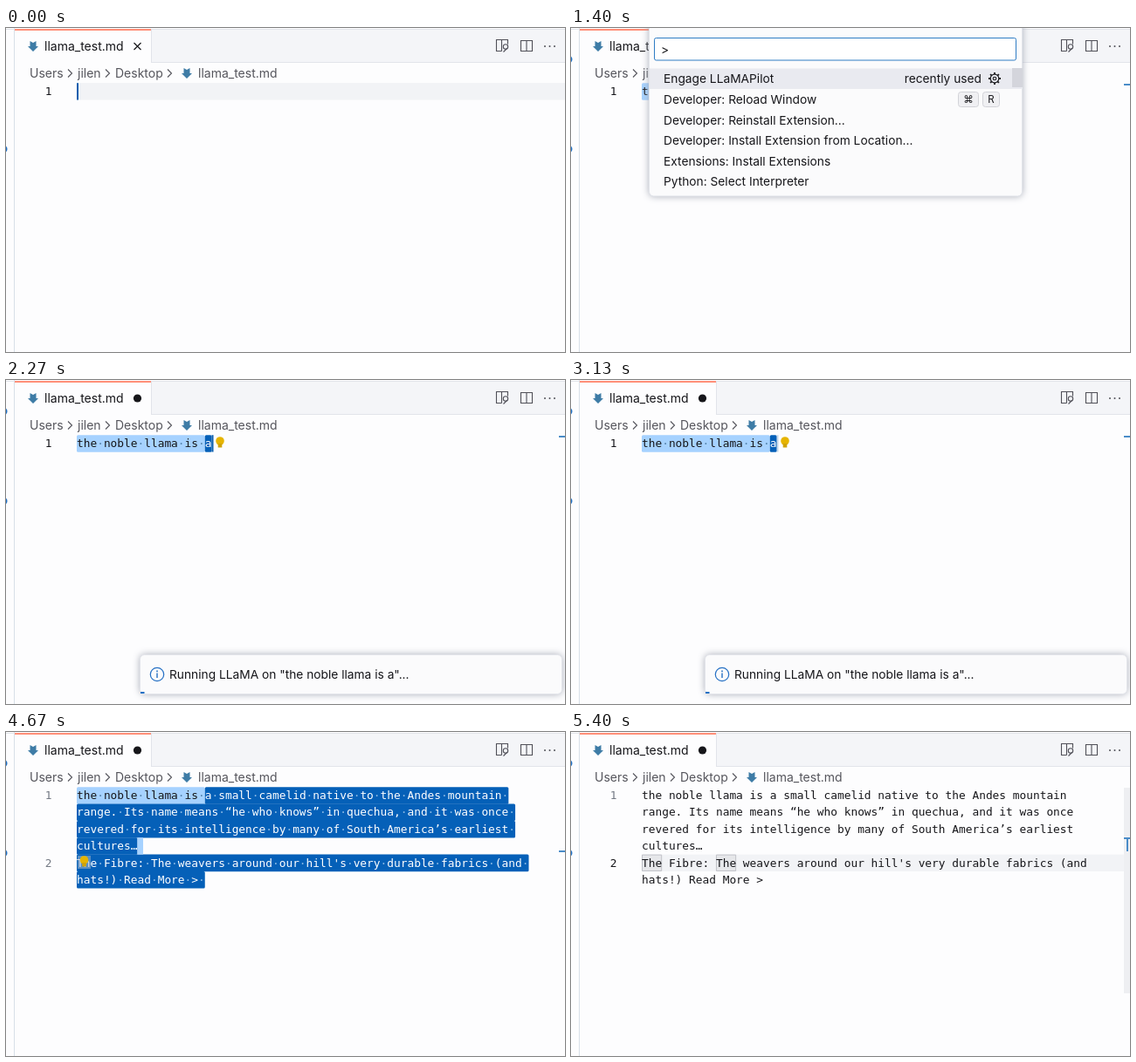
Write an HTML page with a canvas that moves like this. It is 640x372 px and loops after 5.47 s.

```html
<!DOCTYPE html>
<html lang="en">
<head>
<meta charset="utf-8">
<title>Editor completion demo</title>
<style>
html, body { margin: 0; width: 100%; height: 100%; overflow: hidden; background: #fdfdfe; }
canvas { display: block; }
</style>
</head>
<body>
<canvas id="stage" width="640" height="372"></canvas>
<script>
const c = document.getElementById('stage').getContext('2d');
const LOOP = 5470, FRAME = LOOP / 82;
const UI = '14px Inter, sans-serif', LIST = '13.75px Inter, sans-serif', KEY = '11.5px Inter, "DejaVu Sans", sans-serif';
const MONO = '12.83px "DejaVu Sans Mono", monospace';
const CHAR = 7.724, ROW = 19.35, LEFT = 81, TOP = 63.2;
const PAPER = '#fdfdfe', BAR = '#f4f5f8', ACTIVE = '#f2f3f6', EDGE = '#e2e4ea';
const INK = '#16161a', BLUE = '#0560b8', LIGHT = '#a6d2ff';

// Moments of the story, in ms
const AT = { type: 70, select: 1000, menu: 1130, run: 1790, insert: 4330, click: 4930, mark: 5260 };
const PROMPT = 'the noble llama is a';
const LINES = [
  PROMPT + ' small camelid native to the Andes mountain ',
  'range. Its name means “he who knows” in quechua, and it was once ',
  'revered for its intelligence by many of South America’s earliest ',
  'cultures…',
  'The Fibre: The weavers around our hill\'s very durable fabrics (and ',
  'hats!) Read More > '
];
const COMMANDS = ['Engage LLaMAPilot', 'Developer: Reload Window', 'Developer: Reinstall Extension...',
  'Developer: Install Extension from Location...', 'Extensions: Install Extensions', 'Python: Select Interpreter'];

const colX = n => LEFT + n * CHAR;
const rowY = n => TOP + n * ROW;
const ramp = (t, from, span) => Math.max(0, Math.min(1, (t - from) / span));
const blink = t => .5 + .5 * Math.cos((t - 2270) / 300 * 2 * Math.PI);

function rect(x, y, w, h, fill) {
  c.fillStyle = fill;
  c.fillRect(x, y, w, h);
}
function text(s, x, y, fill = INK, font = UI, align = 'left') {
  c.font = font;
  c.fillStyle = fill;
  c.textAlign = align;
  c.fillText(s, x, y);
}
function path(d, stroke, width = 1) {
  c.strokeStyle = stroke;
  c.lineWidth = width;
  c.stroke(new Path2D(d));
}
function disc(x, y, r, fill) {
  c.fillStyle = fill;
  c.beginPath();
  c.arc(x, y, r, 0, 7);
  c.fill();
}
function ring(x, y, r, stroke, width = 1) {
  c.strokeStyle = stroke;
  c.lineWidth = width;
  c.beginPath();
  c.arc(x, y, r, 0, 7);
  c.stroke();
}
function box(x, y, w, h, r, fill, stroke) {
  c.beginPath();
  c.roundRect(x, y, w, h, r);
  c.fillStyle = fill;
  c.fill();
  if (!stroke) return;
  c.shadowColor = 'transparent';
  c.strokeStyle = stroke;
  c.lineWidth = 1;
  c.stroke();
}
function panel(x, y, w, h) {
  c.save();
  c.shadowColor = '#a4a8b4';
  c.shadowBlur = 8;
  box(x, y, w, h, 5, '#fbfbfc', EDGE);
  c.restore();
}
function code(s, col, row, fill = INK) {
  text(s, colX(col), rowY(row) + 13.9, fill, MONO);
}
// Selected text shows its spaces as dim dots
function selected(s, col, row, dark) {
  box(colX(col), rowY(row), s.length * CHAR, ROW + .2, 1.5, dark ? BLUE : LIGHT);
  code(s.replace(/[^ ]/g, ' ').replace(/ /g, (_, i) => s[i] === ' ' ? '·' : ' '), col, row, dark ? '#8ab8e4' : '#5585ad');
  code(s, col, row, dark ? '#fff' : INK);
}
function lineNumber(n, row, active) {
  text(n, 52.5, rowY(row) + 13.9, active ? INK : '#747a84', MONO, 'right');
}
function activeRow(row) {
  rect(LEFT, rowY(row), 559, ROW, ACTIVE);
}
function caret(x, row, alpha = 1) {
  c.globalAlpha = alpha;
  rect(x, rowY(row), 2, ROW, '#0d5fae');
  c.globalAlpha = 1;
}
function bulb(x, y) {
  disc(x, y, 4.8, '#e6b400');
  rect(x - 2.3, y + 3, 4.6, 4.5, '#cfa30a');
}
function fileIcon(x, y) {
  c.fillStyle = '#3e7ca6';
  c.fill(new Path2D(`M${x - 3.5} ${y - 6}l3.5 2 3.5-2v6h2.5l-6 6-6-6h2.5z`));
}

function frame(dirty) {
  rect(0, 0, 640, 372, PAPER);
  rect(0, 1, 9, 1, EDGE);
  rect(166, 2, 474, 38, BAR);
  rect(166, 39, 474, 1, EDGE);
  rect(166, 2, 1, 38, EDGE);
  rect(9, 0, 1, 372, '#d8e0e8');
  rect(9, 1, 631, 1, EDGE);
  rect(10, 1, 156, 2, '#ff8f78');
  disc(-3, 139, 4.5, '#1f6fc4');
  if (dirty) disc(-3, 36, 4.5, '#1f6fc4');

  fileIcon(31, 21);
  text('llama_test.md', 44, 26);
  if (dirty) disc(150.5, 21, 4.6, INK);
  else path('M146.5 17l8 8m0-8l-8 8', INK, 1.2);

  const icon = '#505058';
  path('M567.5 26.5h-6v-13h13v5M567.5 13.5v13M573.5 23.5l-4 4', icon, 1.1);
  ring(572, 21.5, 2.7, icon, 1.1);
  path('M589.5 14.5h13v12h-13zM596 14.5v12', icon, 1.1);
  for (const x of [617, 622.5, 628]) disc(x, 21, 1, icon);

  const crumb = '#55555c';
  text('Users', 27, 57, crumb);
  text('jilen', 82, 57, crumb);
  text('Desktop', 125, 57, crumb);
  text('llama_test.md', 220, 57, crumb);
  fileIcon(207, 52);
  for (const x of [71, 114, 185]) path(`M${x} 47.5l4.5 4.5-4.5 4.5`, crumb, 1.1);
}

function typing(t) {
  const n = Math.max(0, Math.min(20, Math.floor((t - AT.type) / 41.5)));
  activeRow(0);
  lineNumber(1, 0, true);
  code(PROMPT.slice(0, n), 0, 0);
  caret(colX(n) - (n ? 1 : 0), 0);
}

function waiting(t) {
  lineNumber(1, 0, true);
  selected(PROMPT.slice(0, 19), 0, 0, false);
  selected('a', 19, 0, true);
  caret(235.5, 0, blink(t));
  if (t > AT.run) bulb(245, 70);
}

function result() {
  lineNumber(1, 0, false);
  lineNumber(2, 4, false);
  LINES.forEach((s, row) => {
    if (row) return selected(s, 0, row, true);
    selected(s.slice(0, 19), 0, 0, false);
    selected(s.slice(19), 19, 0, true);
  });
  rect(colX(9), rowY(3), 6.5, ROW, LIGHT);
  rect(82, 142, 15, 15, 'rgba(180,190,205,.5)');
  bulb(89.5, 147);
}

function reading(t) {
  activeRow(4);
  lineNumber(1, 0, false);
  lineNumber(2, 4, true);
  if (t > AT.mark) for (const col of [0, 11])
    box(colX(col) + .5, rowY(4) + .5, 3 * CHAR - 1, ROW - 1, 0, '#e6e7ea', '#c0c2c8');
  LINES.forEach((s, row) => code(s, 0, row));
  if (t < AT.mark) caret(LEFT, 4, blink(t));
  c.globalAlpha = ramp(t, AT.mark - 60, 140);
  rect(633, 64, 7, 236, '#eeeff2');
  c.globalAlpha = 1;
}

function menu() {
  panel(89.5, -6, 427, 199);
  box(95.5, 11.5, 414, 25.5, 2, '#fff', '#2f7cc4');
  text('>', 103, 30, INK, LIST);
  rect(90, 46.5, 427, 23.5, '#e9eaf0');
  rect(505, 46, 12, 22, '#d4d5dc');
  COMMANDS.forEach((s, i) => text(s, 106, 63.3 + i * 23.6, INK, LIST));
  text('recently used', 470, 63.3, INK, LIST, 'right');
  ring(485, 58, 4.8, INK, 1.2);
  ring(485, 58, 1.8, INK, 1.1);
  for (let i = 0; i < 8; i++) {
    const x = Math.cos(i * Math.PI / 4), y = Math.sin(i * Math.PI / 4);
    path(`M${485 + x * 5} ${58 + y * 5}L${485 + x * 7} ${58 + y * 7}`, INK, 1.8);
  }
  box(443.5, 73.5, 23, 17, 3, '#f0f0f3', '#d2d3d8');
  box(471.5, 73.5, 19, 17, 3, '#f0f0f3', '#d2d3d8');
  text('⌘', 455, 86, INK, KEY, 'center');
  text('R', 481, 86, INK, KEY, 'center');
}

function toast(t) {
  const show = ramp(t, AT.run, 110) * (1 - ramp(t, AT.insert, 110));
  if (!show) return;
  c.save();
  c.globalAlpha = show;
  panel(153.5, 315.5, 483, 45);
  ring(173, 338, 7.7, '#2570c4', 1.2);
  rect(172.3, 336.5, 1.4, 5.5, '#2570c4');
  rect(172.2, 333.5, 1.6, 1.7, '#2570c4');
  text(`Running LLaMA on "${PROMPT}"...`, 187, 343, INK, LIST);
  rect(154, 358, 4.5, 2, '#1f6fc4');
  c.restore();
}

function draw(t) {
  const dirty = t > AT.type;
  frame(dirty);
  if (t < AT.select) typing(t);
  else if (t < AT.insert) waiting(t);
  else if (t < AT.click) result();
  else reading(t);

  const mark = '#4a8cc8';
  if (t >= AT.click) {
    rect(633, 121, 7, 2, mark);
    rect(636, 121, 2, 16, mark);
  } else if (dirty) {
    rect(633, t < AT.insert ? 64 : 136, 7, 2, mark);
  }
  if (t >= AT.menu && t < AT.run) menu();
  toast(t);
}

let start;
function tick(now) {
  start ??= now;
  const t = (now - start) % LOOP;
  draw(Math.floor(t / FRAME) * FRAME);
  requestAnimationFrame(tick);
}
requestAnimationFrame(tick);
</script>
</body>
</html>
```
